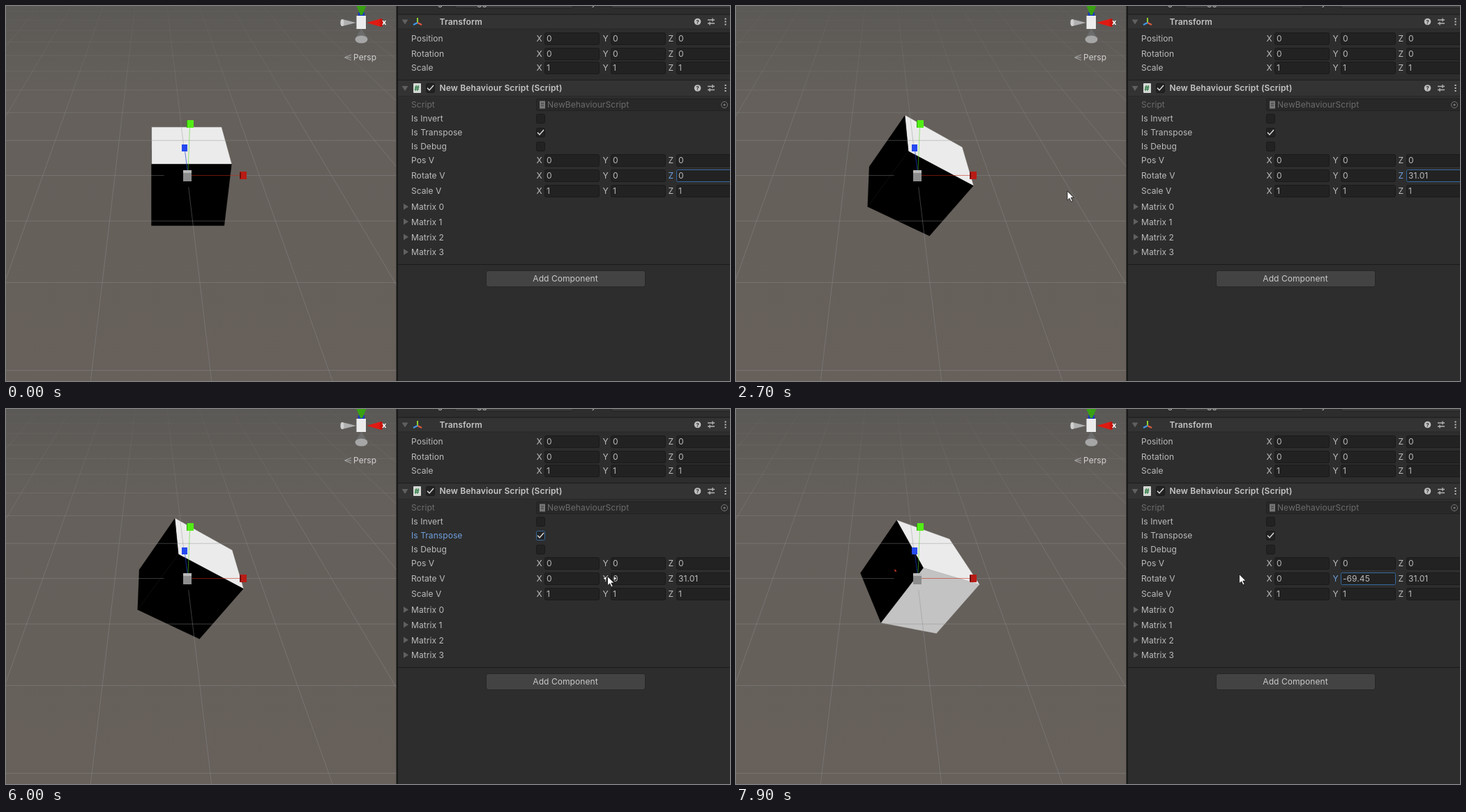
These frames come from a looping animation (1038x539 px, 8 s). An HTML page:

```html
<!DOCTYPE html>
<html lang="en">
<head>
<meta charset="utf-8">
<title>Cube rotation inspector</title>
<style>
  html, body { margin: 0; width: 100%; height: 100%; overflow: hidden; background: #2d2d2d; }
  svg { display: block; width: 1038px; height: 539px; }
  text { font: 12px Inter, sans-serif; letter-spacing: .07px; fill: #bcbcbc; white-space: pre; }
  .bold { font-weight: 600; letter-spacing: .15px; fill: #c6c6c6; }
  .dim { fill: #6c6c6c; }
  .focus { fill: #6f9fdc; }
</style>
</head>
<body>
<svg id="stage" viewBox="0 0 1038 539">
  <defs>
    <linearGradient id="ground" x2="0" y2="1">
      <stop offset="0" stop-color="#5b5956"/>
      <stop offset=".25" stop-color="#65605b"/>
      <stop offset="1" stop-color="#67605b"/>
    </linearGradient>
    <linearGradient id="fade" gradientUnits="userSpaceOnUse" x1="0" y1="0" x2="0" y2="539">
      <stop offset="0" stop-color="#8a8c8c" stop-opacity=".06"/>
      <stop offset=".36" stop-color="#8a8c8c" stop-opacity=".42"/>
      <stop offset="1" stop-color="#8a8c8c" stop-opacity=".45"/>
    </linearGradient>
    <clipPath id="view"><path d="M0 0H560V539H0z"/></clipPath>
  </defs>
  <path d="M0 0H560V539H0z" fill="url(#ground)"/>
  <g id="cube"></g>
  <g id="overlay" clip-path="url(#view)"></g>
  <g id="panel"></g>
  <g id="live"></g>
  <g id="cursor">
    <path id="slide" d="M-6 3l4 -3v6zM13 3l-4 -3v6z" fill="#fff" stroke="#222" stroke-width=".6"/>
    <path d="M0 0V15L3.6 11.8L6.2 17.4L8.6 16.3L6 10.9H10.7z" transform="scale(.88)" fill="#fff" stroke="#111" stroke-width=".9"/>
  </g>
</svg>
<script>
const LOOP = 8000, STEP = 100;
const $ = id => document.getElementById(id);

// ---------- drawing helpers ----------
const text = (x, y, s, cls = '') => `<text x="${x}" y="${Math.round(y + 4.4)}" class="${cls}">${s}</text>`;
const rect = (x, y, w, h, fill, more = '') =>
  `<rect x="${x}" y="${y}" width="${w}" height="${h}" fill="${fill}" ${more}/>`;
const ellipse = (x, y, rx, ry, fill) => `<ellipse cx="${x}" cy="${y}" rx="${rx}" ry="${ry}" fill="${fill}"/>`;
const path = (d, fill, more = '') => `<path d="${d}" fill="${fill}" ${more}/>`;
const stroke = (d, color, width = 1) => path(d, 'none', `stroke="${color}" stroke-width="${width}"`);
const EDGE = '#1a1a1a', FOCUS_EDGE = '#33689f';
const field = (x, y, w, edge = EDGE) =>
  rect(x + .5, y - 8.5, w - 1, 17, '#222', `rx="2" stroke="${edge}"`);
const tick = (x, y) => stroke(`M${x - 4} ${y - .3}l3 3.2l6 -7`, '#d8d8d8', 1.5);
const checkbox = (y, checked, edge = EDGE) =>
  rect(760.5, y - 6.5, 12, 13, '#222', `rx="2" stroke="${edge}"`) + (checked ? tick(766, y) : '');

// ---------- camera ----------
const camera = { x: 208, y: 261.2, focal: 652, dist: 6.3, lift: .17, sin: .572, cos: .82 };
function project([x, y, z]) {
  const depth = camera.dist - y * camera.sin + z * camera.cos;
  const up = y * camera.cos + z * camera.sin + camera.lift;
  return [camera.x + camera.focal * (x + .5) / depth, camera.y - camera.focal * up / depth];
}
const polygon = points => 'M' + points.map(p => p.map(v => v.toFixed(2)).join(' ')).join('L') + 'z';

// ---------- cube ----------
const HALF = .494;
const FACES = [ // axis, side, colour
  [1, 1, '#ebebeb'], [0, 1, '#c3c3c3'], [2, -1, '#000'],
  [0, -1, '#000'], [1, -1, '#000'], [2, 1, '#000']
];
const rad = deg => deg * Math.PI / 180;
function turnY([x, y, z], a) {
  const c = Math.cos(a), s = Math.sin(a);
  return [x * c + z * s, y, z * c - x * s];
}
function turnZ([x, y, z], a) {
  const c = Math.cos(a), s = Math.sin(a);
  return [x * c - y * s, x * s + y * c, z];
}
function cube(yaw, roll, transposed) {
  const a = rad(yaw), b = rad(roll);
  const turn = p => transposed ? turnZ(turnY(p, -a), -b) : turnY(turnZ(p, b), a);
  return FACES.map(([axis, side, color]) => {
    const corners = [[-1, -1], [1, -1], [1, 1], [-1, 1]].map(([u, v]) => {
      const p = [];
      p[axis] = side * HALF;
      p[(axis + 1) % 3] = u * HALF;
      p[(axis + 2) % 3] = v * HALF;
      return project(turn(p));
    });
    const [p, q, r] = corners;
    const winding = (q[0] - p[0]) * (r[1] - p[1]) - (q[1] - p[1]) * (r[0] - p[0]);
    return winding * side > 0 ? path(polygon(corners), color, `stroke="${color}" stroke-width=".2"`) : '';
  }).join('');
}

// ---------- grid, handles and orientation gizmo ----------
function grid() {
  let d = '';
  const line = (a, b) => {
    const [x1, y1] = project(a), [x2, y2] = project(b);
    // a tiny slant keeps the gradient applied to level lines
    d += `M${x1} ${y1}L${x2} ${y2 + .01}`;
  };
  for (let n = -3; n <= 11; n++)
    for (const [a, b] of n ? [[-30, 30]] : [[-30, -.32], [.82, 30]]) line([a, 0, n], [b, 0, n]);
  for (let n = -12; n <= 12; n++)
    for (const [a, b] of n ? [[-3.4, 40]] : [[-3.4, -.28], [.72, 40]]) line([n, 0, a], [n, 0, b]);
  return stroke(d, 'url(#fade)');
}
const handles =
  stroke('M266 243.5H336', 'rgba(200,40,20,.55)') +
  stroke('M261 236L263.5 174', 'rgba(80,220,30,.55)') +
  stroke('M260 236L256.5 208', 'rgba(30,60,220,.65)') +
  rect(335, 238, 10, 11, '#b81c15') + rect(335, 239, 2, 9, '#6d100c') +
  rect(259, 165, 2, 10, '#2d9c0c') + rect(260, 164, 9, 11, '#52ee15') +
  rect(252, 199, 8, 10, '#2449f0') +
  rect(254, 236, 12, 4, '#b9b9b9') + rect(254, 240, 12, 12, '#8d8d8d');
// each cone points at the central box, with its base facing outwards
const orientation =
  path('M505 9h9v6h-9z', '#1737c4') + path('M502.5 0H516.5L511 13H508z', '#38a012') +
  path('M502 24L482 19V29z', '#b0b0b0') + ellipse(482, 24, 2.5, 5, '#d0d0d0') +
  path('M517 24L538 18V30z', '#e01a12') + ellipse(538, 24, 2.5, 6, '#c8140e') +
  path('M509.5 32L500.5 47H518.5z', '#6c6c6c') + ellipse(509.5, 48, 9, 5.5, '#a6a6a6') +
  rect(502.5, 14, 13.5, 19, '#ececec') +
  '<text x="539" y="27" style="font-weight:700;font-size:11px;fill:#fff">x</text>' +
  stroke('M495 70L485.5 74L495 78M486 74H495', '#a8a8a8') +
  '<text x="498" y="78" style="fill:#d2d2d2">Persp</text>';
$('overlay').innerHTML = grid() + handles + orientation;

// ---------- inspector ----------
const COLUMNS = [['X', 772, 79], ['Y', 867, 79], ['Z', 961, 90]];
const vectorRow = (y, label, values, active = -1) => text(581, y, label) +
  COLUMNS.map(([axis, x, w], i) =>
    text(x - 11.5, y, axis, i === active ? 'focus' : '') +
    field(x, y, w, i === active ? FOCUS_EDGE : EDGE) +
    text(x + 3, y, values[i])).join('');
const foldDown = y => path(`M567.5 ${y - 3}h9l-4.5 7z`, '#606060');
const foldRight = y => path(`M570 ${y - 4.5}v9l7 -4.5z`, '#606060');
const headerIcons = y =>
  ellipse(991.5, y, 4.8, 4.8, '#c0c0c0') +
  `<text x="989.2" y="${y + 3.2}" style="font-size:8px;font-weight:700;fill:#333">?</text>` +
  stroke(`M1006 ${y - 2.5}h10M1006 ${y + 2.5}h10M1013 ${y - 5}v5M1009 ${y}v5`, '#b4b4b4', 1.3) +
  [-4, 0, 4].map(dy => rect(1030.5, y + dy - 1, 2, 2, '#c0c0c0')).join('');
const header = (y, h, title) => rect(562, y - h / 2, 476, h, '#333') +
  rect(562, y - h / 2 - 1, 476, 1, '#1d1d1d') + rect(562, y + h / 2, 476, 1, '#292929') +
  foldDown(y) + text(621.5, y, title, 'bold') + headerIcons(y);

$('panel').innerHTML =
  rect(560, 0, 478, 539, '#2d2d2d') + rect(559.5, 0, 2.5, 539, '#191919') +
  text(605, -5.4, 'Tag') + rect(643.5, -14, 170, 17, '#3a3a3a', 'rx="3" stroke="#222"') + text(648, -5.4, 'Untagged') +
  text(826, -5.4, 'Layer') + rect(867.5, -14, 180, 17, '#3a3a3a', 'rx="3" stroke="#222"') +
  header(22.5, 20, 'Transform') +
  stroke('M590 24V17', '#8fd02f', 2) + stroke('M590 24L596 27', '#e05a3a', 2) + stroke('M590 24L584 27', '#3f9ae8', 2) +
  vectorRow(47, 'Position', [0, 0, 0]) +
  vectorRow(69, 'Rotation', [0, 0, 0]) +
  vectorRow(89, 'Scale', [1, 1, 1]) +
  header(118, 22, 'New Behaviour Script (Script)') +
  rect(584, 111, 11, 14, '#d4d8d4', 'rx="1"') +
  '<text x="585.5" y="122" style="font-size:11px;font-weight:700;fill:#287a40">#</text>' +
  rect(602.5, 111.5, 12, 13, '#222', `rx="2" stroke="${EDGE}"`) + tick(608, 118) +
  text(581, 142, 'Script', 'dim') + rect(760.5, 133.5, 290, 17, '#282828', 'rx="2" stroke="#212121"') +
  rect(765, 136.5, 8, 11, '#777') + stroke('M767 140h4M767 143h4', '#333') +
  text(776, 142, 'NewBehaviourScript', 'dim') +
  '<circle cx="1030" cy="142" r="4.5" fill="none" stroke="#777"/>' + ellipse(1030, 142, 1.6, 1.6, '#777') +
  text(581, 162, 'Is Invert') + checkbox(162, false) +
  text(581, 202, 'Is Debug') + checkbox(202, false) +
  vectorRow(222, 'Pos V', [0, 0, 0]) +
  vectorRow(266, 'Scale V', [1, 1, 1]) +
  [289, 310.5, 332.5, 354].map((y, i) => foldRight(y - .5) + text(581, y, 'Matrix ' + i)).join('') +
  rect(562, 371, 476, 1, '#1b1b1b') +
  rect(688.5, 380.5, 228, 23, '#434343', 'rx="3" stroke="#262626"') +
  '<text x="802" y="396" text-anchor="middle" style="fill:#cacaca">Add Component</text>';

// ---------- motion ----------
function sample(keys, t) {
  if (t <= keys[0][0]) return keys[0].slice(1);
  const i = keys.findIndex(k => k[0] > t);
  if (i < 0) return keys[keys.length - 1].slice(1);
  const a = keys[i - 1], b = keys[i], k = (t - a[0]) / (b[0] - a[0]);
  return a.slice(1).map((v, j) => v + (b[j + 1] - v) * k);
}
const ROLL = [[1700, 0], [2000, 1.65], [2200, 4.23], [2500, 19.2], [2600, 27], [2700, 31.01]];
const YAW = [[6200, 0], [6300, 2], [6600, 26.8], [6800, 44.4], [6900, 36], [7000, 25.5], [7600, -61], [7700, -69.45]];
// The pointer leaves the stage while dragging and wraps around the screen.
const POINTER = [
  [[200, 619, 522], [500, 720, 400], [800, 880, 290], [1000, 955, 252], [1100, 950, 246],
   [1600, 948, 243], [1800, 952, 244], [1900, 968, 245], [2000, 1003, 247]],
  [[2500, 82, 275], [2600, 340, 270], [2700, 475, 266], [2800, 475, 266], [3100, 700, 205], [3300, 768, 182],
   [5200, 768, 182], [5600, 928, 230], [5900, 862.5, 240.5], [6200, 862.5, 240.5], [6300, 928, 241]],
  [[6600, 126, 310], [6800, 713, 290.5], [6900, 433, 340], [7000, 83, 395]],
  [[7600, 896, 260], [7700, 608, 240], [7900, 721.5, 237.5]]
];
const between = (t, a, b) => t >= a && t < b;
const show = (id, on) => $(id).setAttribute('visibility', on ? 'visible' : 'hidden');

function draw(t) {
  const [yaw] = sample(YAW, t), [roll] = sample(ROLL, t);
  const transposed = !between(t, 3600, 4200) && !between(t, 4700, 5100);
  const toggleFocus = between(t, 3500, 6200);
  const active = t < 3500 ? 2 : t >= 6200 ? 1 : -1;

  $('cube').innerHTML = cube(yaw, roll, transposed) +
    (t >= 6400 ? path(yaw > 0 ? 'M227 231l6 -1.5l1 4z' : 'M227.5 230l3 3.5h-3z', '#e8452a') : '');
  $('live').innerHTML =
    text(581, 182, 'Is Transpose', toggleFocus ? 'focus' : '') +
    checkbox(182, transposed, toggleFocus ? FOCUS_EDGE : EDGE) +
    vectorRow(244, 'Rotate V', [0, +yaw.toFixed(2), +roll.toFixed(2)], active);

  const leg = POINTER.find((keys, i) =>
    t >= keys[0][0] && (i === POINTER.length - 1 || t <= keys[keys.length - 1][0]));
  if (leg) $('cursor').setAttribute('transform', `translate(${sample(leg, t)})`);
  show('cursor', leg);
  show('slide', leg && (between(t, 1000, 2100) || between(t, 5900, 6400)));
}

const start = performance.now();
function frame() {
  const t = (performance.now() - start) % LOOP;
  draw(Math.floor(t / STEP) * STEP);
  requestAnimationFrame(frame);
}
frame();
</script>
</body>
</html>
```
